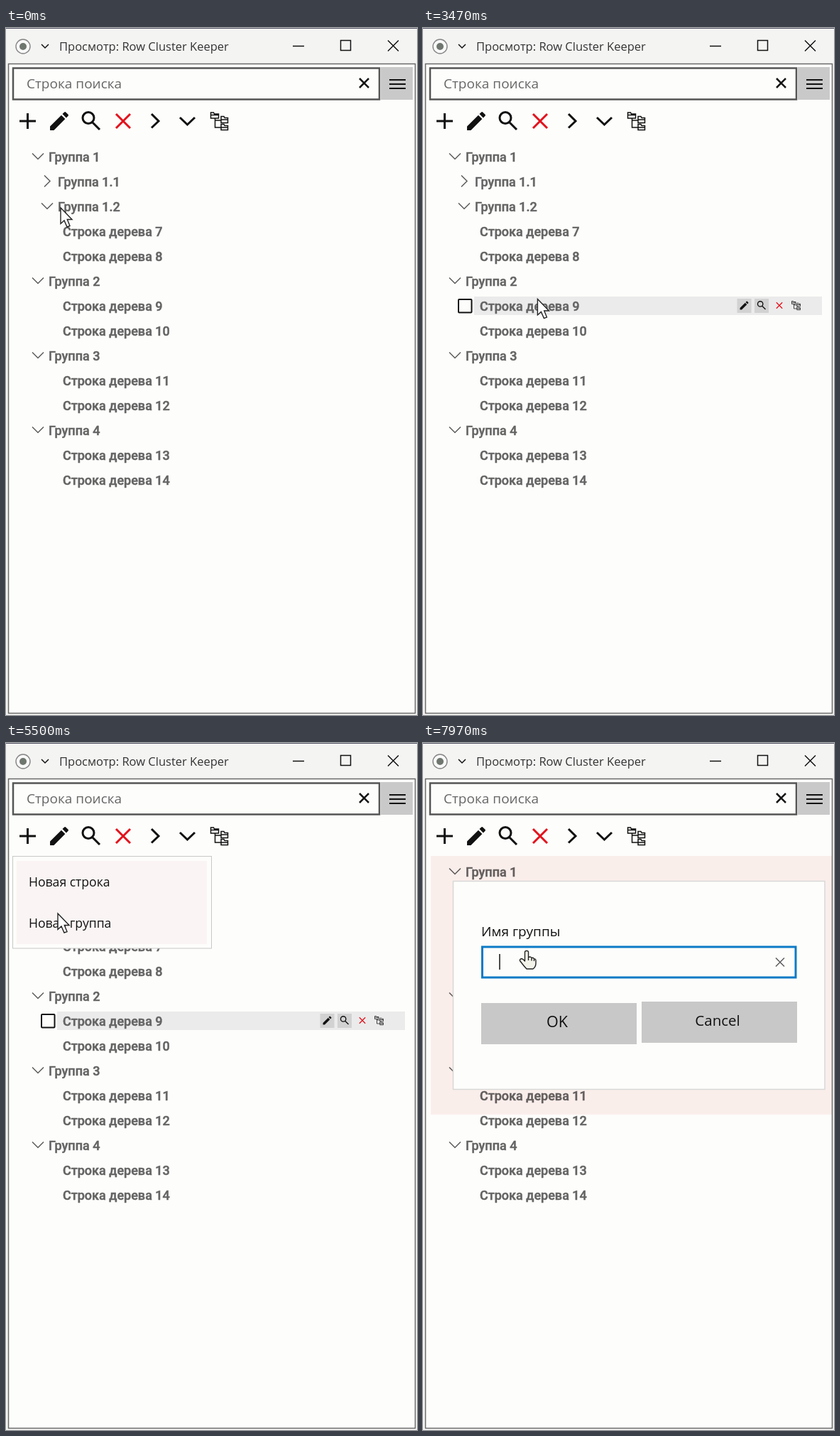
An HTML page that plays this animation: 579 px wide and 967 px high, repeating every 8 s.

```html
<!DOCTYPE html>
<html lang="ru">
<head>
<meta charset="utf-8">
<style>
html, body { margin: 0; width: 100%; height: 100%; overflow: hidden; background: #f4f4f3; }
svg { display: block; }
text { font-family: "Open Sans", sans-serif; fill: #111; }
.tree text { font: 500 18px Roboto, sans-serif; fill: #646464; stroke: #646464; stroke-width: .5px; }
.line { fill: none; stroke: #111; stroke-width: 1.5; }
.thick { stroke-width: 3; }
.gray { stroke: #5c5c5c; }
.red { stroke: #e3101c; }
#shade { fill: #fcf0ef; mix-blend-mode: multiply; }
</style>
</head>
<body>
<svg width="579" height="967" viewBox="0 0 579 967">
  <defs>
    <path id="pencil" transform="scale(1.44) translate(-12 -12)" fill="#111" d="M3 17.25V21h3.75L17.8 9.94l-3.75-3.75zM20.7 7.04a1 1 0 0 0 0-1.41L18.37 3.3a1 1 0 0 0-1.41 0l-1.83 1.83 3.75 3.75z"/>
    <path id="search" class="line thick" d="M2 2L12 12M4-4.500a8 8 0 1 1-16 0a8 8 0 1 1 16 0z"/>
    <path id="cross" class="line thick red" d="M-10-10L10 10M10-10L-10 10"/>
    <path id="branch" class="line" d="M-12-4v-8h4l1 2h6v6zM-12-8.500h11M-6-4V9h8M-6-1h8M2.500 2.500v-9h4l1 2h4.500v7zM2.500-2h9.500M2.500 12.500v-8h4l1 2h4.500v6zM2.500 9h9.500"/>
    <path id="open" class="line gray" d="M-8-4.500L0 3.500L8-4.500"/>
    <path id="closed" class="line gray" d="M-4-8.500L4-.5L-4 7.500"/>
  </defs>

  <rect width="579" height="967" fill="#f4f4f3"/>
  <rect width="579" height="1" fill="#556"/>
  <rect x="3.5" y="50.5" width="573" height="914" fill="#fdfdfb" stroke="#6a6a6a" stroke-width="1.5"/>
  <circle cx="24" cy="26" r="10" fill="#f8f8f8" stroke="#858585" stroke-width="1.4"/>
  <circle cx="24" cy="26" r="5" fill="#6f766f"/>
  <path class="line" d="M50 23l5 5l5-5"/>
  <text x="75" y="32" font-size="16.5" style="fill:#333">Просмотр: Row Cluster Keeper</text>
  <path class="line" d="M404 25.500H420M471.500 17.500h14v14h-14zM538 17.500l15 15M553 17.500l-15 15"/>

  <rect x="10" y="56.500" width="516" height="44" fill="#fdfdfb" stroke="#555" stroke-width="2.500"/>
  <text x="29" y="85" font-size="19" style="fill:#666">Строка поиска</text>
  <path class="line" style="stroke-width:2.500" d="M498 71l13 13M511 71l-13 13"/>
  <rect x="528" y="55" width="45" height="46" fill="#c9c9c9"/>
  <path class="line" style="stroke-width:2" d="M540 73h23M540 79h23M540 85h23"/>

  <rect id="plusHover" x="13" y="115" width="34" height="33" fill="#d9d9d9"/>
  <path class="line thick" d="M19 131h23M30.500 120v22M205 121l10 10l-10 9.500M245 126l10.500 10l10.500-10"/>
  <use href="#pencil" transform="translate(75 131)"/>
  <use href="#search" transform="translate(120 131)"/>
  <use href="#cross" transform="translate(165 131)"/>
  <use href="#branch" transform="translate(300.500 131)"/>

  <g class="tree" id="tree"></g>

  <g id="menu">
    <rect x="9.5" y="159.500" width="280" height="129.500" fill="#fdfdfb" stroke="#c8c8c8"/>
    <rect x="15" y="166" width="268" height="117" fill="#faf5f4"/>
    <text x="32" y="202" font-size="17.6">Новая строка</text>
    <text x="32" y="260" font-size="17.6">Новая группа</text>
  </g>

  <rect id="shade" y="159" height="364"/>
  <g id="panel">
    <rect x="42.500" y="194.500" width="523.500" height="293" fill="#fdfdfb" stroke="#d8d8d8" stroke-width="1.500"/>
    <text x="82" y="272" font-size="19">Имя группы</text>
    <rect x="83.500" y="287" width="441.500" height="43" fill="#fdfdfb" stroke="#0b7ac6" stroke-width="3"/>
    <path id="caret" class="line" d="M108 297v22"/>
    <path class="line gray" d="M497 302.500l12 12M509 302.500l-12 12"/>
    <rect x="82" y="366" width="219" height="58" fill="#c8c8c8"/>
    <rect x="308" y="364" width="219" height="58" fill="#c8c8c8"/>
    <g font-size="20.5" text-anchor="middle">
      <text x="189" y="400" font-size="21.5">OK</text>
      <text x="415" y="398">Cancel</text>
    </g>
  </g>

  <path id="arrow" fill="#fff" stroke="#222" stroke-width="1.4" d="M0 0V22.500L5 18L9 27L13 25.500L9.300 16.500H16z"/>
  <path id="hand" fill="#f4f3ea" stroke="#222" stroke-width="1.4" stroke-linejoin="round" d="M-2.500 14V1.500Q-2.500-.5 0-.5T2.500 1.500V9Q5 7 7 9.500Q9.500 8.500 10.500 11Q13 10.500 13 13.500V17Q13 22 9 25H0Q-3 22-6 18L-9.500 13.500Q-10 11-7 10.500Q-5 11-2.500 14zM2.500 9v4M7 9.500v4M10.500 11v3"/>
</svg>
<script>
const $ = id => document.getElementById(id);
const clamp = v => Math.max(0, Math.min(1, v));
const ramp = (t, from, to) => clamp((t - from) / (to - from));
const rowY = i => 181 + 35 * i;

// Group rows: indent, label, chevron by row index. All other rows are leaves.
const groups = { 0: [0, '1', 'open'], 1: [13, '1.1', 'closed'], 2: [13, '1.2', 'open'],
  5: [0, '2', 'open'], 8: [0, '3', 'open'], 11: [0, '4', 'open'] };
const leaves = [];

function groupRow(i) {
  const [indent, name, chevron] = groups[i];
  return `<use href="#${chevron}" transform="translate(${45 + indent} ${rowY(i)})"/>
    <text x="${60 + indent}" y="${rowY(i) + 6.5}">Группа ${name}</text>`;
}

function leafRow(i) {
  const number = 7 + leaves.length;
  leaves.push(i);
  const tool = (icon, x, size, slide, boxed) => `<g class="tool" data-slide="${slide}">
    ${boxed ? `<rect x="${x - 10}" y="-10" width="20" height="20" fill="#d2d2d2"/>` : ''}
    <use href="#${icon}" transform="translate(${x} -.5) scale(${size})"/></g>`;
  return `<g id="row${i}" transform="translate(0 ${rowY(i)})">
      <rect x="72" y="-13" width="490" height="26" fill="#ebebeb"/>
      <g class="details">
        <rect x="50" y="-9" width="18.5" height="18.5" rx="1" fill="#fdfdfb" stroke="#111" stroke-width="2"/>
        ${tool('pencil', 452.5, .46, 5, true)}${tool('search', 477, .46, 3, true)}
        ${tool('cross', 502, .42, 0)}${tool('branch', 525.5, .5, 0)}
      </g>
    </g>
    <text x="80" y="${rowY(i) + 6.5}">Строка дерева ${number}</text>`;
}

$('tree').innerHTML = Array.from({ length: 14 }, (_, i) => groups[i] ? groupRow(i) : leafRow(i)).join('');

// Row index, pointer enters, pointer leaves. The last stay on row 6 selects it.
const hovers = [[3, 1000, 1180], [4, 1180, 1350], [6, 1600, 1830], [7, 1830, 2300],
  [6, 2300, 9000], [4, 3570, 3630], [3, 3640, 3700]];

const path = [[870, 77, 253], [1100, 85, 290], [1400, 120, 350], [1650, 150, 384], [1900, 165, 412],
  [2200, 168, 408], [2350, 166, 390], [3400, 166, 390], [4050, 28, 135], [5100, 28, 135],
  [5470, 73, 240], [6090, 73, 240], [6130, 75, 250], [7480, 75, 250], [7930, 146, 293]];

function pointer(t) {
  const next = path.findIndex(p => p[0] > t);
  if (next === 0) return path[0].slice(1);
  if (next < 0) return path[path.length - 1].slice(1);
  const a = path[next - 1], b = path[next];
  const p = ramp(t, a[0], b[0]), e = p * p * (3 - 2 * p);
  return [a[1] + (b[1] - a[1]) * e, a[2] + (b[2] - a[2]) * e];
}

const show = (el, opacity) => {
  el.style.display = opacity > 0 ? '' : 'none';
  el.style.opacity = opacity;
};

function drawRows(t) {
  for (const i of leaves) {
    let glow = 0, details = 0;
    for (const [row, enter, leave] of hovers) {
      if (row !== i || t < enter) continue;
      const out = 1 - ramp(t, leave, leave + 150);
      glow = Math.max(glow, out);
      details = Math.max(details, Math.min(out, ramp(t, enter, enter + 200)));
    }
    const row = $('row' + i);
    show(row, glow);
    show(row.querySelector('.details'), details);
    row.querySelectorAll('.tool').forEach(el =>
      el.setAttribute('transform', `translate(${el.dataset.slide * (1 - details)} 0)`));
  }
}

function draw(t) {
  drawRows(t);
  show($('plusHover'), t > 3980 && t < 4400 ? 1 : 0);
  show($('menu'), Math.min(ramp(t, 4400, 4600), 1 - ramp(t, 6630, 6850)));

  const slide = -45 * (1 - ramp(t, 6930, 7430)) ** 2;
  const left = Math.max(0, 11 + slide);
  const fade = ramp(t, 6930, 7130);
  $('shade').setAttribute('x', left);
  $('shade').setAttribute('width', 576 - left);
  $('panel').setAttribute('transform', `translate(${slide} 0)`);
  show($('shade'), fade);
  show($('panel'), fade);
  show($('caret'), t > 6880 && (t - 6880) % 1060 < 530 ? 1 : 0);

  const at = `translate(${pointer(t)})`, overDialog = t > 7560;
  $('arrow').setAttribute('transform', at);
  $('hand').setAttribute('transform', at);
  show($('arrow'), overDialog ? 0 : 1);
  show($('hand'), overDialog ? 1 : 0);
}

const start = performance.now();
(function tick() {
  draw((performance.now() - start) % 8000);
  requestAnimationFrame(tick);
})();
</script>
</body>
</html>
```
